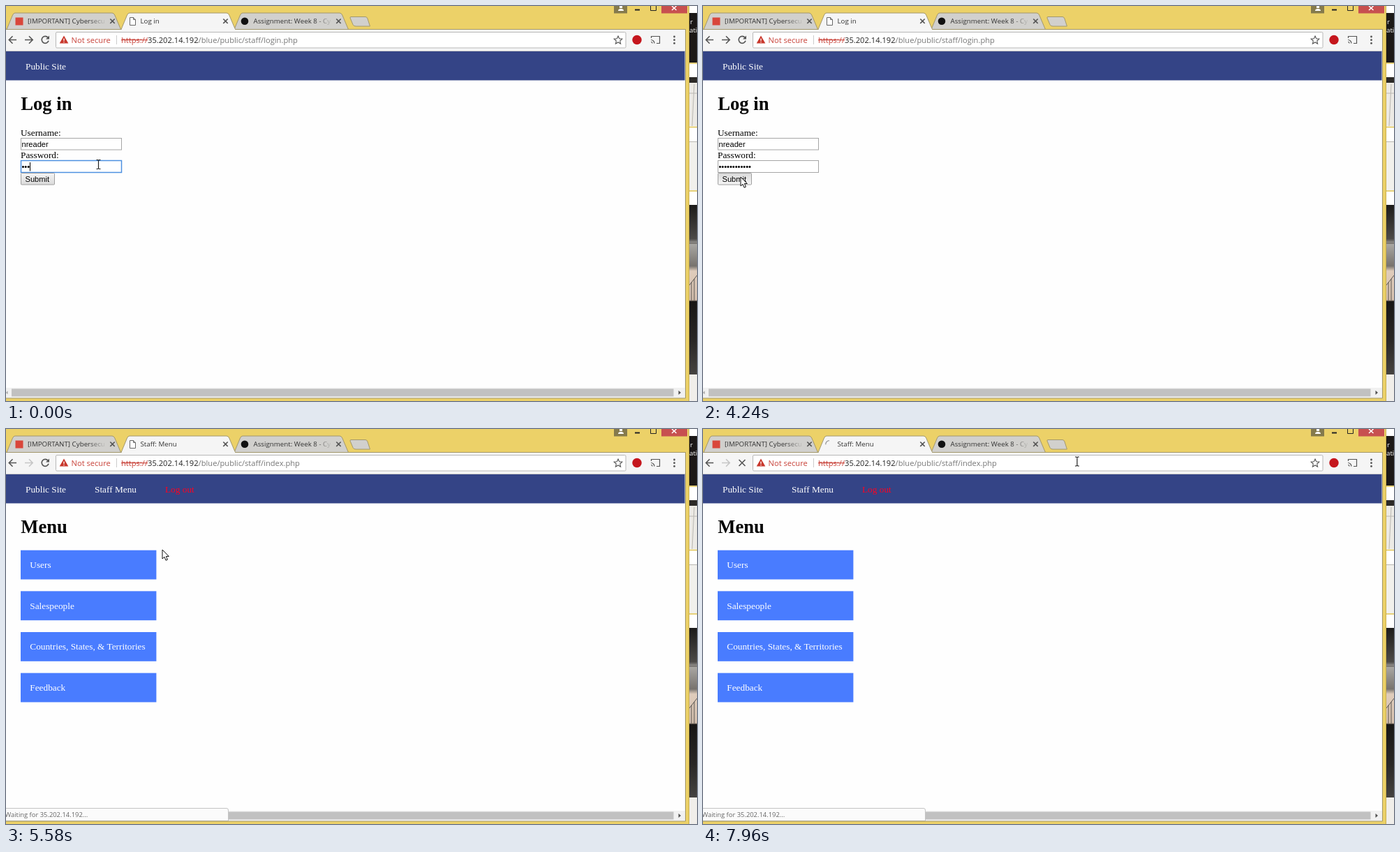
Animation of 990 by 566 pixels, one loop 8000 ms. Source, as an HTML page:

```html
<!DOCTYPE html>
<html lang="en">
<head>
<meta charset="utf-8">
<title>Log in</title>
<style>
html, body { margin: 0; width: 100%; height: 100%; overflow: hidden; background: #ecd168; }
svg { display: block; width: 990px; height: 566px; }
text { white-space: pre; }
.ui { font: 9.75px "Open Sans", "Noto Sans", sans-serif; fill: #333; }
.url { font-size: 11.15px; fill: #777; }
.serif { font: 13.3px "Liberation Serif", "Times New Roman", serif; }
.h1 { font-size: 26.6px; font-weight: bold; }
.form { font: 11.1px "Liberation Sans", Arial, sans-serif; }
.line { fill: none; stroke: #555; stroke-width: 1.6; }
.pointer { fill: #fff; stroke: #111; stroke-width: 1; stroke-linejoin: round; }
</style>
</head>
<body>
<svg viewBox="0 0 990 566">
  <defs>
    <path id="tab" d="M0 33.5L8.5 13Q9.800 10 12 10H151Q153.500 10 154.800 13L163.500 33.500"/>
    <path id="close" d="M-3.200-3.200L3.200 3.200M3.200-3.200L-3.200 3.200"/>
    <linearGradient id="fade"><stop stop-color="#d1d0cd" stop-opacity="0"/><stop offset="1" stop-color="#d1d0cd"/></linearGradient>
    <linearGradient id="up" x2="0" y2="1"><stop stop-color="#f5f5f5"/><stop offset="1" stop-color="#dadada"/></linearGradient>
    <linearGradient id="down" x2="0" y2="1"><stop stop-color="#dadada"/><stop offset="1" stop-color="#f5f5f5"/></linearGradient>
    <linearGradient id="photo" x2="0" y2="1">
      <stop stop-color="#1c1b1a"/><stop offset=".2" stop-color="#4c4a48"/>
      <stop offset=".23" stop-color="#a9a7a3"/><stop offset=".36" stop-color="#77736e"/>
      <stop offset=".39" stop-color="#dfccbb"/><stop offset=".56" stop-color="#d5c0ae"/>
      <stop offset=".57" stop-color="#171615"/><stop offset=".8" stop-color="#292726"/>
      <stop offset="1" stop-color="#454341"/>
    </linearGradient>
  </defs>

  <!-- window behind, right edge -->
  <g id="behind">
    <rect x="979" width="11" height="566" fill="#fff"/>
    <rect x="979" y="10" width="11" height="71" fill="#1b1817"/>
    <rect x="979" y="102" width="11" height="8" fill="#2b2927"/>
    <rect x="979" y="110" width="11" height="62" fill="#eceae5"/>
    <rect x="979" y="194" width="11" height="70" fill="#f1f0ec"/>
    <path d="M979 125h11M979 194.500h11M986 112l-3 60" stroke="#b9b7b2" fill="none"/>
    <path d="M979 82h11M979 173.500h11M979 265h11" stroke="#e0c24f" stroke-width="1.500"/>
    <rect x="979" y="285" width="11" height="243" fill="url(#photo)"/>
    <path d="M979 340h11M979 400l11-14M982 396v26M986 391v31" stroke="#5b5753" fill="none"/>
    <rect x="979" y="528" width="11" height="38" fill="#f0eeea"/>
    <g class="ui" style="fill:#fff"><text x="980" y="26">r</text><text x="979" y="38">ati</text></g>
  </g>

  <!-- frame and window buttons -->
  <rect width="979" height="566" fill="#ecd168"/>
  <path d="M978.500 0V566" stroke="#c8ae4b"/>
  <rect x="871" width="19" height="10.500" fill="#857a4c"/>
  <path d="M877 7q0-3 4-3t4 3zM879 0h4v3h-4z" fill="#fff"/>
  <path d="M901 5.500h7" stroke="#222" stroke-width="2"/>
  <path d="M923.500 0V6.500H931.500V0" fill="none" stroke="#222"/>
  <rect x="939" width="37" height="10.500" fill="#c75050"/>
  <path d="M954 0l6.500 6M960.500 0L954 6" stroke="#fff" stroke-width="1.500"/>

  <!-- tabs -->
  <g fill="#d1d0cd" stroke="#a3986c">
    <use href="#tab" x="1"/><use href="#tab" x="327"/>
    <path d="M494 15.500H515Q517 15.500 518 18L521.500 29H501Q498 29 497 26.500L493 17Q493 15.500 494 15.500Z"/>
  </g>
  <path d="M0 33.500H973" stroke="#a3986c"/>
  <rect y="34" width="973" height="528" fill="#f5f5f5"/>
  <use href="#tab" x="165" fill="#f5f5f5" stroke="#a3986c"/>
  <path d="M166 33.500H328" stroke="#f5f5f5" stroke-width="1.500"/>
  <rect x="13.500" y="16.500" width="11" height="11" fill="#d9463a"/>
  <circle cx="342" cy="21.700" r="5.300" fill="#111"/>
  <g class="ui">
    <text x="31" y="25">[IMPORTANT] Cybersecu</text>
    <text id="title" x="192.500" y="25"></text>
    <text x="354.500" y="25">Assignment: Week 8 - Cy</text>
  </g>
  <rect x="118" y="14" width="26" height="16" fill="url(#fade)"/>
  <rect x="442" y="14" width="26" height="16" fill="url(#fade)"/>
  <g class="line" stroke-width="1.500"><use href="#close" x="152.500" y="21.700"/><use href="#close" x="314.500" y="21.700"/><use href="#close" x="476.500" y="21.700"/></g>
  <path id="page-icon" d="M177.500 16.500H182.500L185.500 19.500V27.500H177.500ZM182.500 16.500V19.500H185.500" fill="#fff" stroke="#666"/>
  <path id="spinner" fill="none"/>

  <!-- toolbar -->
  <path class="line" d="M15 48.500H4.500M9.500 43.300L4.300 48.500L9.500 53.700"/>
  <path id="forward" class="line" d="M27 48.500H38M33 43.300L38.200 48.500L33 53.700"/>
  <g id="reload"><path class="line" d="M60.200 45.300A5 5 0 1 0 61 49.800"/><path d="M62 42.500V47.500H57Z" fill="#555"/></g>
  <path id="stop" class="line" d="M51.500 44L60.500 53M60.500 44L51.500 53"/>
  <rect x="71.500" y="37.500" width="816.500" height="22.500" rx="1.500" fill="#fff" stroke="#b8b8b8"/>
  <path d="M83 42.500L89.300 53.500H76.700Z" fill="#c8372c"/>
  <path d="M83 46.500V50M83 51V52.300" stroke="#fff" stroke-width="1.300"/>
  <path d="M158.500 42V55" stroke="#ccc"/>
  <g class="ui">
    <text class="url" x="93.500" y="52.700" style="fill:#c8433a">Not secure</text>
    <text class="url" x="165" y="52.700"><tspan fill="#c8433a" text-decoration="line-through">https</tspan><tspan fill="#c8433a" text-decoration="line-through">://</tspan><tspan fill="#222">35.202.14.192</tspan><tspan id="path"></tspan></text>
  </g>
  <path d="M877 43l1.700 3.800 4.100.4-3.100 2.800.9 4.100-3.600-2.100-3.600 2.100.9-4.100-3.100-2.800 4.100-.4z" fill="none" stroke="#555" stroke-width="1.100"/>
  <circle cx="904" cy="48.500" r="6.700" fill="#c5161d"/>
  <path d="M924.500 46V43.500H936.500V53.500H932M924 48.500a5 5 0 0 1 5 5M924 51.500a2 2 0 0 1 2 2" fill="none" stroke="#555" stroke-width="1.200"/>
  <g fill="#555"><circle cx="957.500" cy="44" r="1.400"/><circle cx="957.500" cy="48.700" r="1.400"/><circle cx="957.500" cy="53.400" r="1.400"/></g>
  <path d="M0 64.500H973" stroke="#c9c9c9"/>

  <!-- page -->
  <rect y="65" width="972.500" height="482" fill="#fefefe"/>
  <rect y="65" width="972.500" height="41.500" fill="#344486"/>
  <g class="serif">
    <text x="28" y="90.700" fill="#fff">Public Site</text>
    <text id="heading" class="h1" x="21.300" y="148.700"></text>
  </g>
  <g id="login">
    <g class="serif"><text x="21" y="185.500">Username:</text><text x="21" y="218.300">Password:</text></g>
    <rect x="21.500" y="189.500" width="144" height="16.500" fill="#fff" stroke="#a6a6a6"/>
    <rect id="field" x="21.500" y="221.500" width="144" height="17" fill="#fff"/>
    <rect id="button" x="21.500" y="239.500" width="48" height="16.500" rx="1" stroke="#a0a0a0"/>
    <g class="form">
      <text x="22.500" y="201.500">nreader</text>
      <text id="dots" x="22.400" y="234"></text>
      <text x="27.500" y="251.500">Submit</text>
    </g>
    <path id="caret" stroke="#000" d="M0 224V236.500"/>
  </g>
  <g id="menu" class="serif" fill="#fff">
    <text x="127" y="90.700">Staff Menu</text>
    <text x="228" y="90.700" fill="#ff0020">Log out</text>
  </g>

  <!-- scrollbar, status and lower edge -->
  <rect y="547" width="973" height="14.500" fill="#f1f1f1"/>
  <rect x="8" y="548.500" width="948.500" height="11" fill="#c1c1c1"/>
  <path d="M2.500 551.500V556.500L0 554Z" fill="#a3a3a3"/><path d="M963.500 551V557L967 554Z" fill="#505050"/>
  <g id="status">
    <path d="M-1 543.500H316Q318.500 543.500 318.500 546V561.500H-1Z" fill="#fbfbfb" stroke="#c4c4c4"/>
    <text id="status-text" class="ui" x="-1.500" y="556" style="font-size:9.4px;fill:#666"></text>
  </g>
  <path d="M0 562H973.500V33" fill="none" stroke="#a3986c"/>

  <!-- pointers -->
  <path id="arrow" class="pointer" d="M0 0V13L3 10.300L5 15.200L7.400 14.200L5.400 9.500H9.300Z"/>
  <path id="beam" fill="none" stroke="#222" stroke-width="1.200" d="M-3-6.500H-1.200L0-5.700L1.200-6.500H3M0-6V6M-3 6.500H-1.200L0 5.700L1.200 6.500H3"/>
  <path id="hand" class="pointer" d="M-1.500 1.500a1.400 1.400 0 0 1 2.800 0V7Q2.500 6 3.700 7.500Q5 6.500 6.200 8Q7.500 7.300 8.300 9V13.500L6.800 18.500H-.5L-4.600 11.500Q-4.700 9.500-3 10L-1.500 12Z"/>
</svg>
<script>
const LOOP = 8000;
const $ = id => document.getElementById(id);
const show = (id, on) => $(id).style.display = on ? '' : 'none';
const set = (id, name, value) => $(id).setAttribute(name, value);

const keys = [470, 1090, 1510, 1920, 2350, 2620, 2850, 3080, 3300];

// time, pointer, x, y: the screen is sampled, so the pointer jumps
const moves = [
  [0, 'beam', 132.5, 227], [3520, 'beam', 112, 228], [3670, 'beam', 92, 230],
  [3810, 'arrow', 72, 240], [3950, 'arrow', 58, 244], [4100, 'arrow', 54, 245],
  [4820, 'arrow', 72, 240], [4970, 'arrow', 110, 222], [5120, 'arrow', 162, 199],
  [5290, 'arrow', 205, 182], [5450, 'arrow', 218, 177], [5580, 'arrow', 224, 173],
  [5850, 'arrow', 290, 130], [5980, 'arrow', 370, 80], [6110, 'beam', 416, 55],
  [6250, 'arrow', 424, 61], [6390, 'arrow', 426, 62], [6680, 'arrow', 394, 86],
  [6880, 'arrow', 262, 154], [7060, 'hand', 154, 199], [7220, 'hand', 122.5, 207.5],
  [7520, 'hand', 122.5, 207.5], [7680, 'beam', 450, 52], [7830, 'beam', 515, 48],
  [7960, 'beam', 536, 46.5]
];

const svgEl = (name, attrs) => {
  const el = document.createElementNS($('menu').namespaceURI, name);
  for (const key in attrs) el.setAttribute(key, attrs[key]);
  return $('menu').appendChild(el);
};
const items = ['Users', 'Salespeople', 'Countries, States, & Territories', 'Feedback'].map((label, i) => {
  const y = 173.7 + i * 58.65;
  const box = svgEl('rect', { x: 21, y, width: 194.4, height: 41.8 });
  svgEl('text', { x: 34.3, y: y + 25.3 }).textContent = label;
  return box;
});

function arc(from, to) {
  const point = deg => {
    const a = deg * Math.PI / 180;
    return `${181 + 5.3 * Math.cos(a)} ${22 + 5.3 * Math.sin(a)}`;
  };
  return `M${point(from)}A5.3 5.3 0 ${to - from > 180 ? 1 : 0} 1 ${point(to)}`;
}

function draw(t) {
  const within = (a, b) => t >= a && t < b;
  const [at, pointer, x, y] = moves.findLast(m => m[0] <= t);
  for (const id of ['arrow', 'beam', 'hand']) show(id, id === pointer);
  set(pointer, 'transform', `translate(${x} ${y})`);

  const committed = t >= 5290, menu = t >= 5580;
  const loading = within(4360, 5580) || t >= 7520;
  const blue = within(5290, 5580);

  // tab and toolbar
  $('title').textContent = committed ? 'Staff: Menu' : 'Log in';
  $('path').textContent = `/blue/public/staff/${committed ? 'index' : 'login'}.php`;
  set('forward', 'style', committed ? 'stroke:#c6c6c6' : '');
  show('reload', !loading);
  show('stop', loading);
  show('page-icon', !loading);
  show('spinner', loading);
  const step = Math.max(at, within(4360, 4820) ? t - (t - 4360) % 155 : 0);
  const sweep = Math.min(180, 8 + (step - (t < 6000 ? 4360 : 7520)) * 0.19);
  const turn = t < 5450 ? -120 : 0;
  set('spinner', 'd', blue ? arc(180 + turn, 425 + turn) : arc(270 - sweep, 270));
  set('spinner', 'stroke', blue ? '#4f86e8' : '#999');
  set('spinner', 'stroke-width', blue ? 1.8 : 1.3);

  // login form
  show('login', !menu);
  show('menu', menu);
  $('heading').textContent = menu ? 'Menu' : 'Log in';
  const count = 3 + keys.filter(k => k <= t).length;
  const focus = t < 4240;
  $('dots').textContent = '•'.repeat(count);
  set('caret', 'transform', `translate(${Math.floor(22.9 + count * 3.885) + 0.5} 0)`);
  show('caret', focus && !within(930, 1090) && !within(3810, 4240));
  set('field', 'stroke', focus ? '#4d90e0' : '#a6a6a6');
  set('field', 'stroke-width', focus ? 1.5 : 1);
  set('button', 'fill', `url(#${within(4240, 4360) ? 'down' : 'up'})`);

  // menu and status
  items.forEach((box, i) => box.setAttribute('fill', !i && pointer === 'hand' ? '#3f6fe0' : '#497cff'));
  show('status', within(4820, 5850) || t >= 7370);
  $('status-text').textContent = within(7370, 7830)
    ? 'https://35.202.14.192/blue/public/staff/users/index.php'
    : 'Waiting for 35.202.14.192...';
}

function tick() {
  draw(performance.now() % LOOP);
  requestAnimationFrame(tick);
}
tick();
</script>
</body>
</html>
```
